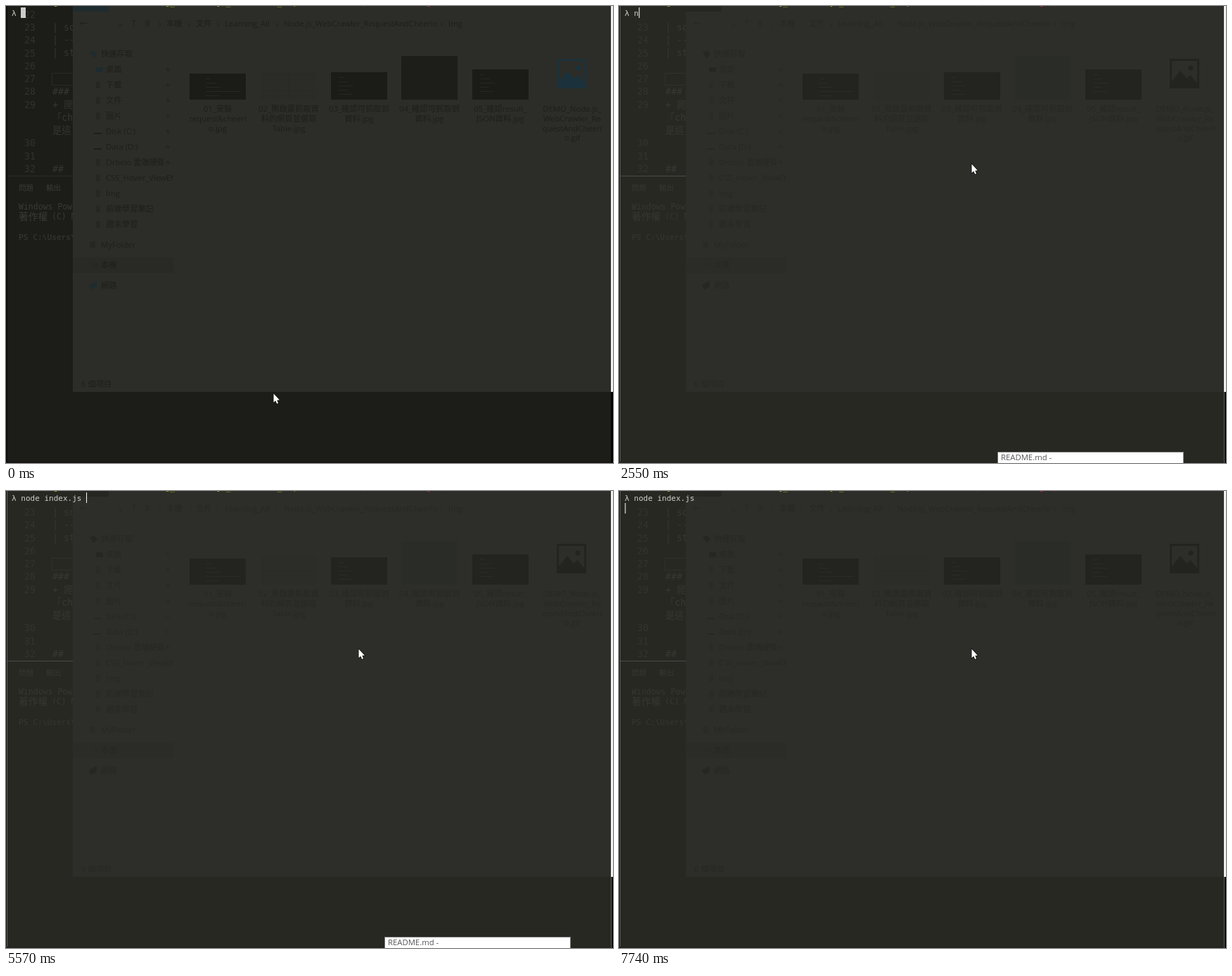
Write an HTML page with a canvas that moves like this. It is 863 px wide and 649 px high and loops after 8000 ms.

```html
<!DOCTYPE html>
<html lang="zh-Hant">
<head>
<meta charset="utf-8">
<style>
  html, body { margin: 0; width: 100%; height: 100%; overflow: hidden; background: #1c1d18; }
  canvas { display: block; }
</style>
</head>
<body>
<canvas id="stage" width="863" height="649"></canvas>
<script>
const ctx = document.getElementById('stage').getContext('2d');
const LOOP = 8000;
const FOCUS_TIME = 1450;
const UI = "'Open Sans', 'Noto Sans CJK TC', 'Noto Sans CJK', sans-serif";
const MONO = "'DejaVu Sans Mono', 'Noto Sans CJK TC', 'Noto Sans CJK', monospace";
const CELL = 6.6;

const idle = {
  back: '#1c1d18', panel: '#2c2d28', ink: '#1e1f1b', faint: '#262722', select: '#292a25',
  thumb: '#1b1c18', tall: '#1d1e1a', sheet: '#2b2c27', blue: '#1b313b', tint: '#1f2c2f',
  num: '#31322c', code: '#35362f', mark: '#292a24', shell: '#393a33', rule: '#292c2b', edge: '#0c0d0b'
};
const focused = {
  back: '#272822', panel: '#2d2e29', ink: '#272823', faint: '#2a2b26', select: '#2b2c27',
  thumb: '#232420', tall: '#2a2d27', sheet: '#2c2d28', blue: '#232420', tint: '#262722',
  num: '#33342e', code: '#373831', mark: '#30312b', shell: '#363730', rule: '#4a4b46', edge: '#62635e'
};

// Values hold from their time until the next entry.
const typing = [[0, ''], [2550, 'n'], [2730, 'no'], [3330, 'nod'], [3630, 'node'], [3790, 'node '],
  [4390, 'node i'], [4530, 'node in'], [4990, 'node ind'], [5290, 'node inde'], [5570, 'node index.js ']];
const caret = [[0, 'block'], [1750, 'bar'], [3170, ''], [3330, 'bar'], [4250, ''], [4390, 'bar'],
  [6010, ''], [6570, 'bar'], [7150, ''], [7590, 'bar'], [7740, 'newline']];
const preview = [[0, 0], [1750, 0.46], [1990, 1], [6720, 0.53], [6850, 0]];
const pointerSteps = [[0, 0], [150, 1], [310, 2], [470, 3], [640, 4], [800, 5], [960, 6], [1130, 7]];
const valueAt = (steps, t) => steps.findLast(step => step[0] <= t)[1];

function rect(x, y, w, h, color) {
  ctx.fillStyle = color;
  ctx.fillRect(x, y, w, h);
}

function frame(x, y, w, h, color) {
  ctx.strokeStyle = color;
  ctx.lineWidth = 1;
  ctx.strokeRect(x + .5, y + .5, w - 1, h - 1);
}

function label(text, x, y, color, size = 11.3, font = UI, align = 'left') {
  ctx.font = `${size}px ${font}`;
  ctx.textAlign = align;
  ctx.textBaseline = 'alphabetic';
  ctx.fillStyle = color;
  ctx.fillText(text, x, y + size * .36);
}

function polygon(points, fill, outline) {
  ctx.beginPath();
  points.forEach(([x, y]) => ctx.lineTo(x, y));
  ctx.closePath();
  if (outline) {
    ctx.strokeStyle = outline;
    ctx.lineWidth = 1.5;
    ctx.stroke();
  }
  ctx.fillStyle = fill;
  ctx.fill();
}

function clipped(x, y, w, h, draw) {
  ctx.save();
  ctx.beginPath();
  ctx.rect(x, y, w, h);
  ctx.clip();
  draw();
  ctx.restore();
}

function drawEditor(c) {
  clipped(0, 0, 95, 649, () => {
    for (let n = 22; n <= 32; n++) {
      const y = 12 + (n - 22 + (n > 29 ? 2 : 0)) * 18.25;
      label(n, 42, y, c.num, 13.2, MONO, 'right');
    }
    const code = [['| sc', 30], ['| --', 48], ['| st', 66], ['+ 爬', 140], ['「ch', 158], ['是這', 176]];
    code.forEach(([text, y]) => label(text, 66, y, c.code, 13.2, MONO));
    label('###', 66, 121, c.code, 13.2, MONO);
    label('## 【', 66, 231, c.code, 13.2, MONO);
    frame(65, 95, 40, 18, c.mark);
    rect(0, 241, 95, 1, c.rule);
    label('問題', 18, 258, c.shell, 10.5);
    label('輸出', 57, 258, c.shell, 10.5);
    label('Windows PowerShell', 18, 285, c.shell, 11.5, MONO);
    label('著作權', 18, 299, c.shell, 13.8, MONO);
    label('(C) M', 65, 299, c.shell, 11.5, MONO);
    label('PS C:\\Users\\', 18, 328, c.shell, 11.2, MONO);
  });
}

function drawSidebar(c) {
  rect(95, 357, 143, 22, c.select);
  polygon([[119, 66], [125, 63], [130, 68], [125, 74]], c.tint);
  label('快速存取', 135, 68, c.ink);
  const items = ['桌面', '下載', '文件', '圖片', 'Disk (C:)', 'Data (D:)', 'Orbelo 雲端硬碟',
    'CSS_Hover_ViewEffect', 'Img', '前端學習筆記', '週末學習'];
  clipped(95, 60, 143, 330, () => items.forEach((name, i) => {
    const y = 90 + i * 22;
    if (i === 0) rect(128, y - 3, 10, 7, c.tint);
    else if (i === 4 || i === 5) rect(125, y + 2, 11, 2, c.ink);
    else rect(128, y - 5, 6, 10, c.faint);
    label(name, 142, y, c.ink);
    if (i < 7) {
      rect(224, y - 5, 14, 11, c.panel);
      polygon([[229, y - 3], [233, y], [231, y + 3], [227, y + 1]], c.faint);
    }
  }));
  rect(119, 334, 8, 10, c.faint);
  label('MyFolder', 135, 339, c.ink);
  rect(122, 365, 9, 6, c.faint);
  label('本機', 135, 368, c.ink);
  polygon([[118, 396], [129, 391], [129, 399], [121, 403]], c.tint);
  label('網路', 135, 397, c.ink);
}

function drawFiles(c) {
  const files = [
    [301, 96, 37, ['01_安裝', 'request&cheeri', 'o.jpg']],
    [402, 92, 41, ['02_開啟要抓取資', '料的網頁並選取', 'Table.jpg']],
    [502, 94, 39, ['03_確認可抓取到', '資料.jpg']],
    [602, 71, 62, ['04_確認可抓取到', '資料.jpg']],
    [703, 90, 43, ['05_確認result_', 'JSON資料.jpg']],
    [805, 75, 42, ['DEMO_Node.js_', 'WebCrawler_Re', 'questAndCheeri', 'o.gif']]
  ];
  files.forEach(([x, y, h, lines], i) => {
    if (i < 5) {
      rect(x - 40, y, 80, h, i === 1 ? c.sheet : i === 3 ? c.tall : c.thumb);
      if (i === 1) {
        for (let row = 0; row < 5; row++) rect(x - 37, y + 4 + row * 8, 74, 1, c.select);
        for (let col = 0; col < 4; col++) rect(x - 36 + col * 18, y + 2, 1, 37, c.select);
      } else if (i !== 3) {
        const left = x - (i === 0 ? 17 : 29);
        for (let row = 0; row < 5; row++) rect(left, y + 7 + row * 6, 7 + row * 7 % 16, 1, c.faint);
        if (i === 0) rect(left, y + 25, 50, 1, c.faint);
      }
    }
    lines.forEach((text, row) => label(text, x, 146 + row * 13.8, c.ink, 11.3, UI, 'center'));
  });
  rect(783, 75, 42, 42, c.blue);
  rect(786, 78, 36, 36, c.panel);
  polygon([[786, 114], [786, 107], [798, 92], [807, 103], [812, 98], [822, 109], [822, 114]], c.blue);
  ctx.beginPath();
  ctx.arc(813, 88, 3.5, 0, Math.PI * 2);
  ctx.fill();
}

function drawExplorer(c) {
  rect(95, 0, 766, 548, c.panel);
  rect(95, 0, 51, 8, c.tint);
  label('←', 105, 25, c.ink);
  label('⌄', 158, 25, c.ink);
  label('↑', 176, 25, c.ink);
  rect(198, 20, 6, 9, c.faint);
  const crumbs = [['本機', 228], ['文件', 270], ['Learning_All', 311],
    ['Node.js_WebCrawler_RequestAndCheerio', 395], ['Img', 629]];
  crumbs.forEach(([text, x]) => {
    label('›', x - 11, 25, c.ink);
    label(text, x, 25, c.ink);
  });
  drawSidebar(c);
  drawFiles(c);
  label('6 個項目', 107, 537, c.ink);
}

function drawPrompt(t) {
  const typed = valueAt(typing, t);
  const mode = valueAt(caret, t);
  clipped(0, 0, 863, 2, () => {
    label('C:\\Users\\guests\\Documents\\Learning_All\\Node.js_WebCrawler_RequestAndCheerio',
      8, -4.6, '#8fbd20', 11, MONO);
    label('(master -> origin)', 505, -4.6, '#d52461', 11, MONO);
  });
  if (typed) rect(21, 3, Math.max(22, typed.length * CELL), 16, focused.back);
  if (typed.length > 11) rect(95, 8, 20, 11, focused.panel);
  label('λ', 8, 10, '#d0d0cb', 11, MONO);
  label(typed, 21.3, 10, '#d0d0cb', 11, MONO);
  if (mode === 'block') rect(21, 2, 7, 15, '#cccccc');
  if (mode === 'bar') rect(21.65 + typed.length * CELL, 2, 1, 15, '#ffffff');
  if (mode === 'newline') rect(8.45, 17, 1, 15, '#ffffff');
}

function drawPreview(t) {
  const alpha = valueAt(preview, t);
  if (!alpha) return;
  ctx.globalAlpha = alpha;
  rect(538, 633, 265, 16, '#ffffff');
  frame(538, 633, 265, 20, '#767676');
  ctx.globalAlpha = 1;
  label('README.md -', 543, 641, alpha < 1 ? '#3b3b39' : '#575757');
}

function drawPointer(t) {
  const progress = valueAt(pointerSteps, t) / 7;
  const eased = progress * progress * (3 - 2 * progress);
  const x = 380.5 + 121 * eased, y = 550.5 - 326 * eased;
  const outline = [[0, 0], [0, 12.5], [2.8, 10], [4.6, 14.2], [6.6, 13.4], [4.8, 9.3], [8.4, 9]];
  polygon(outline.map(([dx, dy]) => [x + dx, y + dy]), '#ffffff', '#11120f');
}

function draw(now) {
  const t = now % LOOP;
  const c = t < FOCUS_TIME ? idle : focused;
  rect(0, 0, 863, 649, c.back);
  drawEditor(c);
  drawExplorer(c);
  rect(0, 0, 1, 649, '#0b0c0a');
  rect(1, 0, 1, 649, c.edge);
  rect(0, 647, 861, 2, t < FOCUS_TIME ? '#181314' : '#23231f');
  rect(860, 548, 1, 101, c.edge);
  rect(860, 0, 3, 548, '#f0f0f0');
  rect(861, 548, 2, 101, '#000000');
  drawPrompt(t);
  drawPreview(t);
  drawPointer(t);
}

const start = performance.now();
function tick() {
  draw(performance.now() - start);
  requestAnimationFrame(tick);
}
tick();
</script>
</body>
</html>
```
